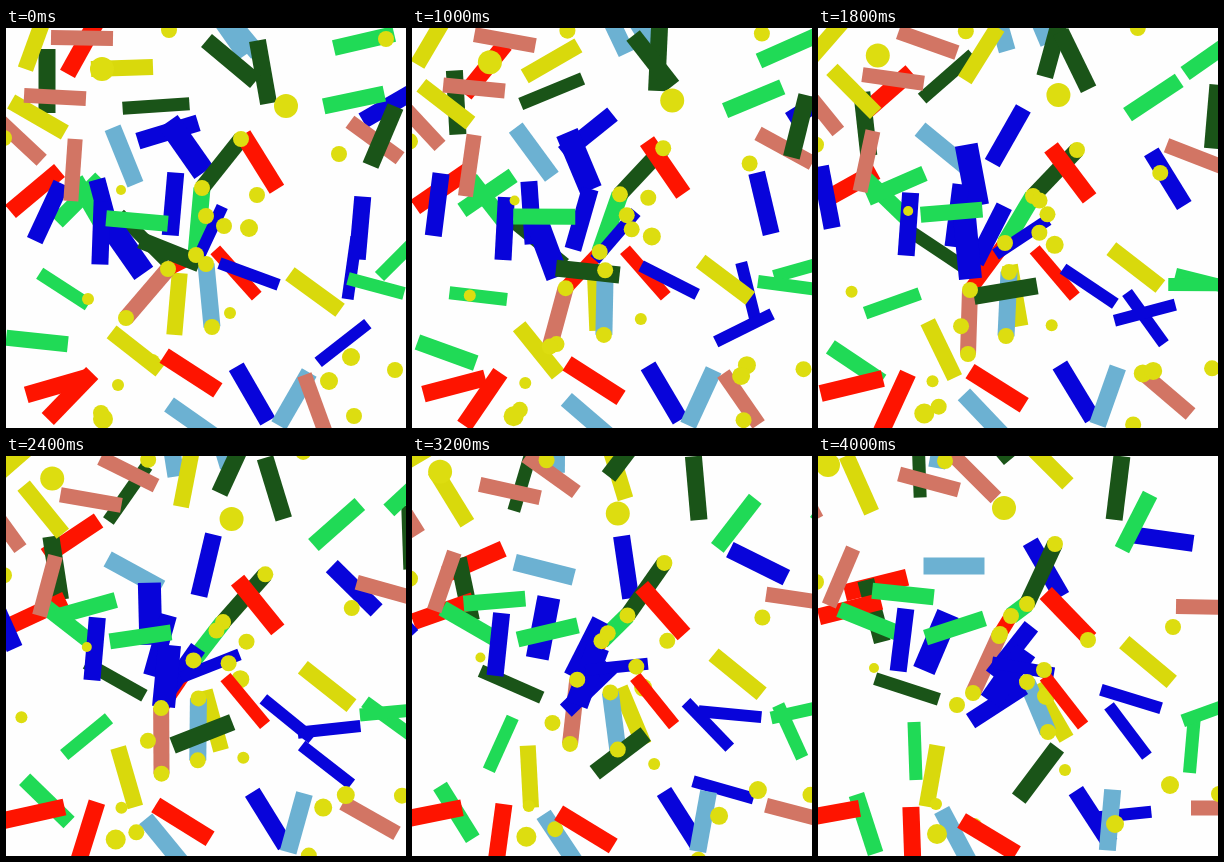
Recreate the animation shown at these times as an HTML page with a canvas. Size 400x400 px, loop 4.2 s.

```html
<!DOCTYPE html>
<html lang="en">
<head>
<meta charset="utf-8">
<title>Drifting rods</title>
<style>
html, body { margin: 0; width: 100%; height: 100%; overflow: hidden; background: #fefefe; }
canvas { display: block; width: 100vmin; height: 100vmin; }
</style>
</head>
<body>
<canvas id="stage" width="400" height="400"></canvas>
<script>
const ctx = document.getElementById('stage').getContext('2d');
const LOOP = 4200, STEP = 200, LAST = 19;
const BEND = 8 / LAST; // progress at which a joint passes its middle point
const SALMON = '#d27564', GREEN = '#20da56', SKY = '#6cb1d2', RED = '#fe1400',
      FOREST = '#1a5418', DOT = '#dddd10';
const parts = []; // draw functions of progress 0..1, back to front

function bar(color, x, y, angle, len, width) {
  ctx.save();
  ctx.translate(x, y);
  ctx.rotate(angle);
  ctx.fillStyle = color;
  ctx.fillRect(-len / 2, -width / 2, len, width);
  ctx.restore();
}

function disc(x, y, r) {
  ctx.fillStyle = DOT;
  ctx.beginPath();
  ctx.arc(x, y, r, 0, Math.PI * 2);
  ctx.fill();
}

// Rods of one kind: centre and degrees at the start, then total drift and spin.
const kind = (color, len, width) => (x, y, deg, dx, dy, spin) =>
  parts.push(p => bar(color, x + dx * p, y + dy * p, (deg + spin * p) * Math.PI / 180, len, width));

const dot = (r, x, y, dx, dy) => parts.push(p => disc(x + dx * p, y + dy * p, r));

// Smooth path through three points.
const joint = (a, b, c) => p => [0, 1].map(i =>
  a[i] * (p - BEND) * (p - 1) / BEND +
  b[i] * p * (p - 1) / (BEND * (BEND - 1)) +
  c[i] * p * (p - BEND) / (1 - BEND));

// Elastic rod held between two joints.
const link = (color, width, from, to) => parts.push(p => {
  const [x0, y0] = from(p), [x1, y1] = to(p);
  bar(color, (x0 + x1) / 2, (y0 + y1) / 2, Math.atan2(y1 - y0, x1 - x0),
      Math.hypot(x1 - x0, y1 - y0), width);
});
const cap = at => parts.push(p => disc(...at(p), 8));

const salmon = kind(SALMON, 62, 15);
const red = kind(RED, 64, 17);
const slimRed = kind(RED, 62, 13);
const yellow = kind('#d9d90c', 62, 16);
const forest = kind(FOREST, 64, 17);
const slimForest = kind(FOREST, 67, 13);
const green = kind(GREEN, 62, 16);
const slimGreen = kind(GREEN, 58, 13);
const sky = kind(SKY, 61, 17);
const blue = kind('#0804da', 63, 17);
const slimBlue = kind('#0804da', 63, 12);
const wideBlue = kind('#0804da', 62, 23);

// One chain of four links, and a single hanging link.
const chain = [
  joint([235, 111], [259, 122], [237, 88]),
  joint([196, 160], [215, 168], [209, 148]),
  joint([190, 227], [187, 215], [193, 160]),
  joint([162, 241], [152, 262], [182, 178]),
  joint([120, 290], [150, 326], [155, 237])
];
const hook = joint([200, 236], [191, 244], [209, 226]);
const tail = joint([206, 299], [188, 308], [230, 276]);

// Back layer
sky(118, 128, 68, 18, -18, -68);
sky(222, 2, 55, -98, -20, 45);
sky(232, 2, 50, -32, -35, 40);
sky(188, 394, 35, -50, -13, 27);
yellow(171, 276, 95, 62, -20, -35);
link(SKY, 17, hook, tail);
red(77, 18, -61, -19, 111, 47);
forest(41, 53, 90, 15, 102, -15);
red(29, 163, -40, 3, -10, 26);
link(GREEN, 17, chain[1], chain[2]);
link(RED, 14, chain[2], chain[3]);
link(SALMON, 16, chain[3], chain[4]);
slimForest(137, 210, 45, -48, 23, -27);
green(85, 178, 60, -35, -13, -38);
green(73, 172, -45, 12, -34, 51);
dot(9, 243, 200, -15, 40);
dot(8, 95, 385, 61, -15);
dot(8, 146, 334, -7, -85);

// Blue rods
blue(162, 104, -17, 66, 9, -103);
wideBlue(180, 119, 55, -62, 67, 58);
blue(167, 176, 95, 12, 72, 52);
blue(99, 182, 75, 95, 13, 53);
wideBlue(120, 220, 55, 70, 0, 70);
blue(42, 184, -65, -80, -35, -85);
blue(384, 77, -30, 96, -7, -10);
blue(354, 200, 95, -10, -117, -87);
slimBlue(346, 240, 98, -44, 119, -104);
slimBlue(337, 315, -38, -24, -72, 55);
blue(246, 366, 60, 29, -5, -3);
slimBlue(203, 207, -65, 2, 5, 75);
blue(95, 205, 92, -11, -21, 5);

// Upper left
yellow(30, 12, -70, -42, -10, 50);
slimForest(150, 78, -4, -49, -70, -88);
salmon(76, 10, 1, 80, 10, 44);
yellow(116, 40, -2, 112, -34, -133);
yellow(32, 89, 30, 9, -61, 36);
salmon(49, 69, 3, 62, -43, 12);
salmon(13, 111, 43, -29, -75, 19);
salmon(67, 142, 94, -44, -21, 19);

// Upper right
forest(257, 44, 80, -52, -62, 60);
forest(225, 33, 40, 75, -1, 57);
salmon(369, 112, 36, 20, 39, -35);
forest(377, 108, 113, 48, -46, -43);
green(358, 13, -13, 82, 35, -52);
green(348, 72, -12, -30, -6, -51);

// Middle
green(131, 193, 5, 6, -21, -23);
link(FOREST, 16, chain[0], chain[1]);
red(254, 134, 58, -4, 26, -12);
slimRed(230, 245, 48, 16, 0, 4);
slimBlue(243, 246, 20, 67, 29, 33);
forest(164, 224, 22, 56, 93, -75);
yellow(309, 264, 36, 21, -58, 4);
slimGreen(394, 228, -45, -20, 60, 140);
slimGreen(370, 258, 15, 22, -3, -35);

// Bottom
slimGreen(58, 261, 33, 39, 34, -125);
green(31, 313, 6, 17, 55, 66);
yellow(130, 323, 38, -16, -3, 62);
red(51, 358, -16, -41, 0, 6);
red(64, 368, -46, 30, 15, -46);
red(185, 345, 33, -14, 36, -2);
sky(288, 371, -60, 4, -7, -25);
salmon(309, 376, 70, 95, -24, -70);

// Dots
chain.concat(hook, tail).forEach(cap);
dot(12, 96, 41, -86, -32);
dot(12, 280, 78, -94, -26);
dot(8, 333, 126, 22, 45);
dot(8, 163, 2, -36, 3);
dot(8, 380, 11, -143, -26);
dot(8, 389, 342, 12, -4);
dot(9, 345, 329, -48, 39);
dot(9, 323, 353, 29, -24);
dot(8, 348, 388, -78, 20);
dot(10, 97, 391, 22, -13);
dot(6, 112, 357, 6, -9);
dot(6, 224, 285, 23, 29);
dot(8, 251, 167, -70, 13);
dot(8, 200, 188, 70, -4);
dot(8, 218, 198, 8, 16);
dot(6, 82, 271, -115, -17);
dot(5, 115, 162, -59, 50);
dot(8, -2, 110, 0, 16);

function frame() {
  const time = performance.now() % LOOP;
  // The first pose holds for two steps.
  const progress = Math.max(0, Math.floor(time / STEP) - 1) / LAST;
  ctx.fillStyle = '#fefefe';
  ctx.fillRect(0, 0, 400, 400);
  parts.forEach(draw => draw(progress));
  requestAnimationFrame(frame);
}
frame();
</script>
</body>
</html>
```
